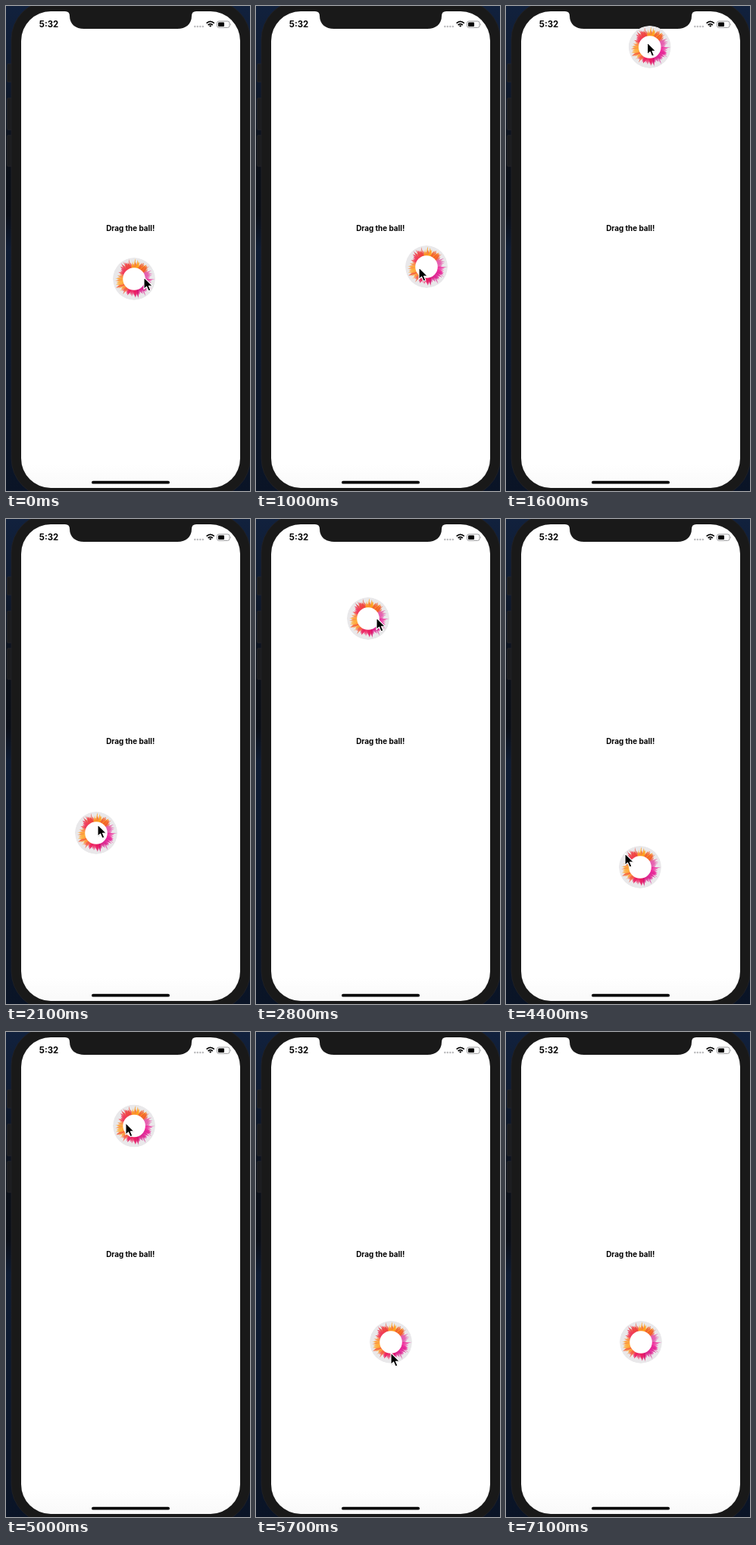
Recreate the animation shown at these times as an HTML page. Size 322 px wide and 638 px high, loop 7300 ms.

```html
<!DOCTYPE html>
<html lang="en">
<head>
<meta charset="utf-8">
<title>Drag the ball</title>
<style>
  html, body { margin: 0; width: 100%; height: 100%; overflow: hidden; background: #0c1629; }
  svg { display: block; width: 100vw; height: 100vh; }
  text { font-family: Inter, "Liberation Sans", sans-serif; font-weight: 700; fill: #000; }
</style>
</head>
<body>
<svg viewBox="0 0 322 638">
  <defs>
    <linearGradient id="desk" x2="0" y2="1">
      <stop offset="0" stop-color="#11213d"/>
      <stop offset=".12" stop-color="#0f1c33"/>
      <stop offset=".3" stop-color="#0b1019"/>
      <stop offset=".43" stop-color="#0a0e17"/>
      <stop offset=".5" stop-color="#0e1c34"/>
      <stop offset="1" stop-color="#0a1426"/>
    </linearGradient>
    <linearGradient id="paper" x2="0" y2="1">
      <stop offset=".95" stop-color="#fff"/>
      <stop offset="1" stop-color="#f9f9f9"/>
    </linearGradient>
    <clipPath id="round"><circle r="28"/></clipPath>
  </defs>

  <rect width="322" height="638" fill="url(#desk)"/>
  <g fill="#1c1d20" stroke="#292a2e" stroke-width=".6">
    <rect x="1.5" y="76" width="8" height="24" rx="1.5"/>
    <rect x="1.5" y="121" width="8" height="42" rx="1.5"/>
    <rect x="1.5" y="170" width="8" height="41" rx="1.5"/>
  </g>
  <rect x="7" y="-7" width="315.5" height="653" rx="51" fill="#191919" stroke="#222327" stroke-width=".8"/>
  <rect x="20" y="7" width="289" height="627" rx="39" fill="url(#paper)"/>
  <path d="M78 6V7Q84 7 84 13C84 24 92 30 103 30H226C237 30 245 24 245 13Q245 7 251 7V6Z" fill="#191919"/>

  <text x="43.8" y="28.3" font-size="11.4">5:32</text>
  <g fill="#b9b9bb">
    <circle cx="249.3" cy="27" r="1.2"/><circle cx="252.8" cy="27" r="1.2"/>
    <circle cx="256.3" cy="27" r="1.2"/><circle cx="259.8" cy="27" r="1.2"/>
  </g>
  <g fill="none" stroke="#000" stroke-width="1.7">
    <path d="M264.6 22.7Q269.7 18.2 274.8 22.7"/>
    <path d="M266.6 25Q269.7 22.3 272.8 25"/>
    <path d="M268 25.9Q269.7 24.8 271.4 25.9L269.7 27.8Z" fill="#000" stroke="none"/>
  </g>
  <rect x="278.5" y="20" width="16.5" height="8.4" rx="2.4" fill="none" stroke="#8f8f91" stroke-width=".9"/>
  <rect x="280" y="21.4" width="8" height="5.6" rx="1" fill="#000"/>
  <path d="M296.2 22.7Q297.6 24.2 296.2 25.7Z" fill="#8f8f91"/>

  <text x="164.2" y="296" font-size="9.9" text-anchor="middle">Drag the ball!</text>
  <rect x="113" y="624.8" width="103" height="3.8" rx="1.9" fill="#000"/>

  <g id="ball" clip-path="url(#round)">
    <circle r="28" fill="#e9e8ea"/>
    <g id="splash"></g>
    <circle r="14.8" fill="#fff"/>
  </g>
  <g id="cursor">
    <path d="M.6 1.2V16.4L4.2 13 6.7 18.6 9.4 17.4 7 12H11.8Z" opacity=".18"/>
    <path d="M0 0V15.5L3.6 12.2 6.1 18 8.9 16.8 6.5 11.2H11.2Z" stroke="#fff" stroke-width="1.1" stroke-linejoin="round"/>
  </g>
</svg>
<script>
const LOOP = 7300, STEP = 100, HIDE = 6200, TAU = 2 * Math.PI;
const $ = id => document.getElementById(id);

// Stops on the way: ball centre (x, y), pointer tip from it (dx, dy),
// and the size of the loop swung on the way to the next stop (rx, ry)
const stops = [
  { t: 0,    x: 169, y: 359, dx: 13,  dy: -2,  rx: 40,  ry: 140 },
  { t: 800,  x: 250, y: 325, dx: 4,   dy: 6,   rx: 0,   ry: 0 },
  { t: 1000, x: 225, y: 343, dx: -10, dy: 1,   rx: -80, ry: -334 },
  { t: 2100, x: 119, y: 413, dx: 2,   dy: -11, rx: -30, ry: -220 },
  { t: 3500, x: 177, y: 289, dx: 20,  dy: 9,   rx: 55,  ry: 222 },
  { t: 4400, x: 177, y: 458, dx: -20, dy: -18, rx: -35, ry: -316 },
  { t: 5700, x: 178, y: 408, dx: 0,   dy: 14,  rx: 0,   ry: 0 },
  { t: HIDE, x: 178, y: 408, dx: 50,  dy: -68, rx: 0,   ry: 0 }
];

const mix = (a, b, u) => a + (b - a) * u;

function pose(time) {
  const t = Math.min(time, HIDE);
  const i = stops.findIndex((s, k) => k > 0 && t <= s.t);
  const a = stops[Math.max(i, 1) - 1], b = stops[Math.max(i, 1)];
  const u = (t - a.t) / (b.t - a.t), ease = u * u * (3 - 2 * u);
  return {
    x: mix(a.x, b.x, u) + a.rx * Math.sin(TAU * u),
    y: mix(a.y, b.y, u) + a.ry * (1 - Math.cos(TAU * u)) / 2,
    dx: mix(a.dx, b.dx, ease),
    dy: mix(a.dy, b.dy, ease)
  };
}

// Paint colours clockwise from the right
const hues = ["#f02a9c", "#dc2a96", "#dc1470", "#ee2060", "#f8643c", "#ffae3c",
  "#fb8a48", "#f0385a", "#f04a3c", "#ffa01e", "#f2602c", "#e660b0"];
const hueAt = a => hues[Math.floor((a / TAU + 1) * hues.length) % hues.length];

let seed = 11;
const rnd = () => (seed = seed * 16807 % 2147483647) / 2147483647;
const polar = (r, a) => `${(r * Math.cos(a)).toFixed(2)} ${(r * Math.sin(a)).toFixed(2)}`;

// A spike of paint that leans a little and fades with its length
function spike(a, width, tip, alpha) {
  const hue = hueAt(a + (rnd() - .5) * .5);
  return `<path d="M${polar(13, a - width)}Q${polar(tip * .8, a - width * .5)} ${polar(tip, a + (rnd() - .5) * .16)}`
    + `Q${polar(tip * .8, a + width * .5)} ${polar(13, a + width)}Z" fill="${hue}" opacity="${alpha.toFixed(2)}"/>`;
}

function drawSplash() {
  let out = "";
  for (let i = 0; i < 70; i++) {
    const a = i / 70 * TAU;
    out += spike(a, .22, 21 + 3 * rnd() + 1.5 * Math.sin(5 * a), .5 + .3 * rnd());
  }
  for (let i = 0; i < 60; i++)
    out += spike(rnd() * TAU, .06 + .08 * rnd(), 20 + 8 * rnd(), .55 + .4 * rnd());
  $("splash").innerHTML = out;
}

function place(id, x, y) {
  $(id).setAttribute("transform", `translate(${x.toFixed(2)} ${y.toFixed(2)})`);
}

function draw(time) {
  const t = Math.floor(time % LOOP / STEP) * STEP;
  const p = pose(t);
  place("ball", p.x, p.y);
  place("cursor", p.x + p.dx, p.y + p.dy);
  $("cursor").setAttribute("visibility", t < HIDE ? "visible" : "hidden");
}

drawSplash();
const start = performance.now();
(function tick() {
  draw(performance.now() - start);
  requestAnimationFrame(tick);
})();
</script>
</body>
</html>
```
